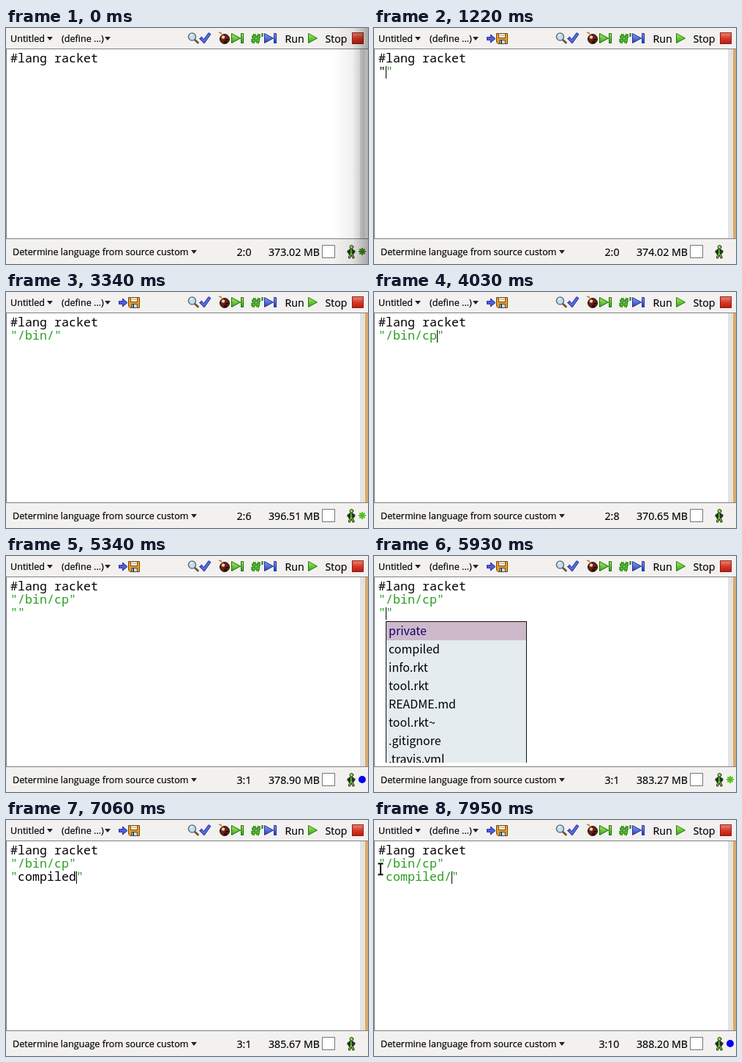
Recreate the animation shown at these times as an HTML page. Size 495x322 px, loop 8 s.

```html
<!DOCTYPE html>
<html lang="en">
<head>
<meta charset="utf-8">
<title>Path completion in an editor</title>
<style>
html, body { margin: 0; width: 100%; height: 100%; overflow: hidden; background: #f2f1f0; }
svg { display: block; width: 495px; height: 322px; }
text { white-space: pre; }
.ui { font-family: "Open Sans", "Noto Sans", sans-serif; font-size: 12.6px; fill: #000; stroke: #000; stroke-width: .2px; }
.big { font-size: 14.2px; }
.code { font-family: "Noto Sans Mono", "DejaVu Sans Mono", monospace; font-size: 16.67px; fill: #28a01e; }
.plain { fill: #000; }
.item { font-family: "Noto Sans CJK JP", "Noto Sans CJK SC", "Noto Sans", sans-serif; font-size: 16px; fill: #000; }
</style>
</head>
<body>
<svg viewBox="0 0 495 322" xmlns="http://www.w3.org/2000/svg">
  <defs>
    <linearGradient id="shadow">
      <stop offset="0" stop-color="#000" stop-opacity="0"/>
      <stop offset=".55" stop-color="#000" stop-opacity=".06"/>
      <stop offset="1" stop-color="#000" stop-opacity=".3"/>
    </linearGradient>
    <linearGradient id="red" x2="0" y2="1">
      <stop offset="0" stop-color="#ee8474"/><stop offset=".5" stop-color="#d63a28"/><stop offset="1" stop-color="#b81c0c"/>
    </linearGradient>
    <linearGradient id="green" x2="0" y2="1">
      <stop offset="0" stop-color="#a4ec5c"/><stop offset="1" stop-color="#35a812"/>
    </linearGradient>
    <linearGradient id="blue" x2="0" y2="1">
      <stop offset="0" stop-color="#8a9cf4"/><stop offset="1" stop-color="#2c3fc4"/>
    </linearGradient>
    <clipPath id="pane"><rect x="0" y="28" width="484" height="254"/></clipPath>
    <path id="down" d="M0 0h8l-4 5z" fill="#222"/>
    <path id="play" d="M0 0L12 6.5L0 13z" stroke-linejoin="round"/>
    <path id="beam" d="M6.500 59.500h1.500l1 1l1-1h1.500M9 61v12M6.500 74.500h1.500l1-1l1 1h1.500"/>
  </defs>

  <rect width="495" height="322" fill="#f2f1f0"/>
  <rect x=".5" y="28.5" width="494" height="259" fill="#fff" stroke="#808080"/>
  <rect x="484" y="29" width="7" height="258" fill="#e3e3e3"/>
  <rect id="edge" x="491" y="29" width="4" height="258"/>

  <g class="ui">
    <text x="6" y="19">Untitled</text>
    <text x="76" y="19">(define ...)</text>
    <text class="big" x="381.5" y="20">Run</text>
    <text class="big" x="436.500" y="20">Stop</text>
    <text x="9" y="310">Determine language from source custom</text>
    <text id="pos" class="big" x="335.500" y="311" text-anchor="end"></text>
    <text id="mem" class="big" x="359" y="311"></text>
  </g>
  <use href="#down" x="56" y="12"/>
  <use href="#down" x="135" y="12"/>
  <use href="#down" x="253" y="303"/>

  <g id="save">
    <path d="M154.500 12.500h5v-3.500l6.500 5.500l-6.500 5.500v-3.500h-5z" fill="#4a5ee0" stroke="#26308c"/>
    <path d="M167.500 7.500h15v14h-13l-2-2z" fill="#f0a020" stroke="#6b4508"/>
    <path d="M170.500 7.500h9v6h-9z" fill="#fff6e4" stroke="#6a4a14"/>
    <path d="M172 10h6" stroke="#999"/>
    <path d="M171.500 16.500h8v5h-8z" fill="#d8d8d8" stroke="#444"/>
    <path d="M173 17h2v4h-2z" fill="#444"/>
  </g>

  <g id="check">
    <path d="M258 16l4.500 4" stroke="#6a5038" stroke-width="2.800" stroke-linecap="round"/>
    <circle cx="254.500" cy="12" r="5" fill="#c4def2" stroke="#66747e" stroke-width="1.600"/>
    <path d="M251.500 11q1-2.500 4-2" fill="none" stroke="#fff" stroke-width="1.300"/>
    <path d="M264.500 14.500l3-2.500l3 3.500l6.500-9l3 2l-9 12.500z" fill="#5068e4" stroke="#24318f" stroke-linejoin="round"/>
  </g>

  <g id="debug">
    <circle cx="299" cy="15" r="6.500" fill="#6a2014" stroke="#250b06"/>
    <path d="M295 8.500q-1-3-4-2" fill="none" stroke="#e08020" stroke-width="1.800"/>
    <circle cx="297" cy="12.500" r="2.200" fill="#f0d0b4"/>
    <path d="M300 16h4M298 19h4" stroke="#1c0805" stroke-width="2"/>
    <use href="#play" x="308.500" y="7.500" fill="url(#green)" stroke="#1e6a0a"/>
    <path d="M321.500 7.500h3v13h-3z" fill="url(#green)" stroke="#1e6a0a"/>
  </g>

  <g id="macro">
    <path d="M340 8l-2 13M346 8l-2 13M336 12h12M335 17h12" fill="none" stroke="#1d6c0c" stroke-width="3.400"/>
    <path d="M340 8l-2 13M346 8l-2 13M336 12h12M335 17h12" fill="none" stroke="#55c42c" stroke-width="1.600"/>
    <path d="M350.500 7v5" stroke="#2a8414" stroke-width="2.200"/>
    <use href="#play" x="353.500" y="7.500" fill="url(#blue)" stroke="#222f8c"/>
    <path d="M366.500 7.500h3v13h-3z" fill="url(#blue)" stroke="#222f8c"/>
  </g>

  <use href="#play" x="413.500" y="7.500" fill="url(#green)" stroke="#257a0c"/>
  <rect x="473.500" y="6.500" width="15" height="15" fill="url(#red)" stroke="#8c1c10"/>

  <rect x="432.500" y="296.500" width="17" height="17" fill="#fff" stroke="#777"/>
  <g id="gc" fill="none" stroke="#3fae28" stroke-width="2.200">
    <path d="M436.500 304a4.800 4.800 0 0 1 8.500-2M445.500 306a4.800 4.800 0 0 1-8.500 2"/>
    <path d="M446 298.500v4h-4M436 311.500v-4h4" stroke-width="1.500"/>
  </g>

  <g id="figure" fill="none" stroke-linecap="round" stroke-linejoin="round">
    <path id="limbs" d="M471.500 302.500l-3.500 2.500l2 3M472.500 302.500l3.500 2.500l-2 2.500M472 302v5l-2.500 6M472 307l3 6" stroke="#223a18" stroke-width="3"/>
    <use href="#limbs" style="stroke:#7ad048;stroke-width:1.200px"/>
    <path d="M472 302v5l-2.500 6M472 307l3 6" stroke="#74cc44" stroke-width="1.400"/>
    <circle cx="472.500" cy="298.800" r="2.400" fill="#8cdc58" stroke="#223a18"/>
  </g>
  <path id="star" fill="none" stroke-width="2"
    d="M487 300v10M482 305h10M483.500 301.500l7 7M490.500 301.500l-7 7"/>
  <circle id="dot" cx="487" cy="305" r="5" fill="#0000f4"/>

  <g class="code">
    <text class="plain" x="6" y="47">#lang racket</text>
    <text id="line2" x="6" y="65"></text>
    <text id="line3" x="6" y="83"></text>
  </g>
  <rect id="caret" width="1" height="17" fill="#000"/>
  <g id="popup" clip-path="url(#pane)"></g>

  <g id="mouse" fill="none" stroke-linecap="square">
    <use href="#beam" stroke="#fff" stroke-width="4"/>
    <use href="#beam" stroke="#000" stroke-width="2"/>
  </g>
  <rect id="shade" x="447" y="0" width="48" height="322" fill="url(#shadow)"/>
</svg>
<script>
const LOOP = 8000, CELL = 10, ROW = 25;
const $ = id => document.getElementById(id);

const lists = {
  bin: { y: 71, width: 67, items: 'cat chacl chgrp chmod chown chvt cp cpio csh' },
  here: { y: 89, width: 193, items: 'private compiled info.rkt tool.rkt README.md tool.rkt~ .gitignore .travis.yml' }
};

// Text put in at the caret; its last `raw` characters stay black until recoloured.
const type = (text, row, col, raw = 1) =>
  ({ ['line' + row]: text, row, col, raw, on: 1, mark: '' });

// Each entry changes part of the state from its time on.
const events = [
  [0, { line2: '', line3: '', row: 2, col: 0, raw: 0, on: 0, pos: '2:0', mem: '373.02',
        mark: 'star', save: 0, shade: 1, gc: 0, mouse: 0, list: '', sel: 0 }],
  [330, { shade: 0 }],
  [780, { on: 1 }],
  [1040, { mem: '374.02' }],
  [1220, { ...type('""', 2, 1), save: 1 }],
  [1260, { pos: '2:1' }],
  [1300, { raw: 0, mem: '377.51' }],
  [1460, { mark: 'dot' }],
  [1560, { mark: 'star' }],
  [1750, { on: 0 }],
  [1990, type('"/"', 2, 2)],
  [2030, { raw: 0, pos: '2:2', mem: '382.16' }],
  [2230, { mark: 'dot' }],
  [2270, { mem: '385.45' }],
  [2310, { mark: 'star' }],
  [2350, { on: 0 }],
  [2720, type('"/b"', 2, 3)],
  [2800, { ...type('"/bi"', 2, 4), pos: '2:3' }],
  [2880, { ...type('"/bin"', 2, 5), pos: '2:4', mem: '391.30' }],
  [2950, { ...type('"/bin/"', 2, 6), pos: '2:5' }],
  [3030, { raw: 0, pos: '2:6', mem: '394.28' }],
  [3190, { mark: 'dot' }],
  [3240, { mem: '396.51' }],
  [3290, { mark: 'star' }],
  [3340, { on: 0 }],
  [3480, { list: 'bin' }],
  [3630, { ...type('"/bin/c"', 2, 7), mark: 'star', gc: 1 }],
  [3670, { raw: 0, pos: '2:7' }],
  [3710, { gc: 0, mem: '368.14' }],
  [3940, { ...type('"/bin/cp"', 2, 8), list: '' }],
  [4030, { raw: 0, pos: '2:8', mem: '370.65' }],
  [4180, { mark: 'dot' }],
  [4280, { mark: 'star', mem: '373.42' }],
  [4340, { col: 9 }],
  [4390, { pos: '2:9' }],
  [4670, { row: 3, col: 0, mark: '' }],
  [4710, { pos: '3:0' }],
  [4830, type('""', 3, 1)],
  [4910, { raw: 0, pos: '3:1', mem: '378.90' }],
  [5150, { on: 0 }],
  [5340, { mark: 'dot' }],
  [5450, { mark: 'star' }],
  [5630, { on: 1 }],
  [5870, { list: 'here' }],
  [5930, { mem: '383.27' }],
  [6110, { on: 0 }],
  [6610, { on: 1 }],
  [6790, { sel: 1 }],
  [6850, { mem: '385.67' }],
  [7060, { ...type('"compiled"', 3, 9, 8), list: '' }],
  [7100, { raw: 0, pos: '3:9' }],
  [7300, { mouse: 1, mark: 'dot' }],
  [7390, { mark: 'star', mem: '386.91' }],
  [7590, type('"compiled/"', 3, 10)],
  [7670, { raw: 0, pos: '3:10' }],
  [7950, { mark: 'dot', mem: '388.20' }]
];

const show = (id, on) => $(id).style.display = on ? '' : 'none';

function drawLine(row, s) {
  let text = s['line' + row];
  if (row === 3 && s.mouse) text = '\u00a0' + text.slice(1);
  const end = s.col, start = end - (row === s.row ? s.raw : 0);
  $('line' + row).innerHTML = start === end ? text :
    `${text.slice(0, start)}<tspan class="plain">${text.slice(start, end)}</tspan>${text.slice(end)}`;
}

function popupMarkup(name, sel) {
  if (!name) return '';
  const { y, width, items } = lists[name];
  const rows = items.split(' ').map((item, i) =>
    `<text class="item" x="20" y="${y + 19 + i * ROW}"${i === sel ? ' style="fill:#14006e"' : ''}>${item}</text>`);
  return `<rect x="16.5" y="${y + .5}" width="${width - 1}" height="260" fill="#e4ecf0" stroke="#111"/>
    <rect x="17" y="${y + 1 + sel * ROW}" width="${width - 2}" height="${ROW}" fill="#cdb9ca"/>` + rows.join('');
}

let drawn = -1;
function render(t) {
  const count = events.filter(e => e[0] <= t).length;
  if (count === drawn) return;
  drawn = count;
  const s = Object.assign({}, ...events.slice(0, count).map(e => e[1]));
  drawLine(2, s);
  drawLine(3, s);
  $('pos').textContent = s.pos;
  $('mem').textContent = s.mem + ' MB';
  $('caret').setAttribute('x', 6 + s.col * CELL);
  $('caret').setAttribute('y', 52 + (s.row - 2) * 18);
  $('popup').innerHTML = popupMarkup(s.list, s.sel);
  $('edge').setAttribute('fill', s.shade ? '#fff' : '#d9aa6c');
  $('star').setAttribute('stroke', s.shade ? '#3a8a14' : '#58c01c');
  show('caret', s.on);
  show('star', s.mark === 'star');
  show('dot', s.mark === 'dot');
  for (const id of ['save', 'shade', 'gc', 'mouse']) show(id, s[id]);
}

const begin = performance.now();
function tick() {
  render((performance.now() - begin) % LOOP);
  requestAnimationFrame(tick);
}
tick();
</script>
</body>
</html>
```
